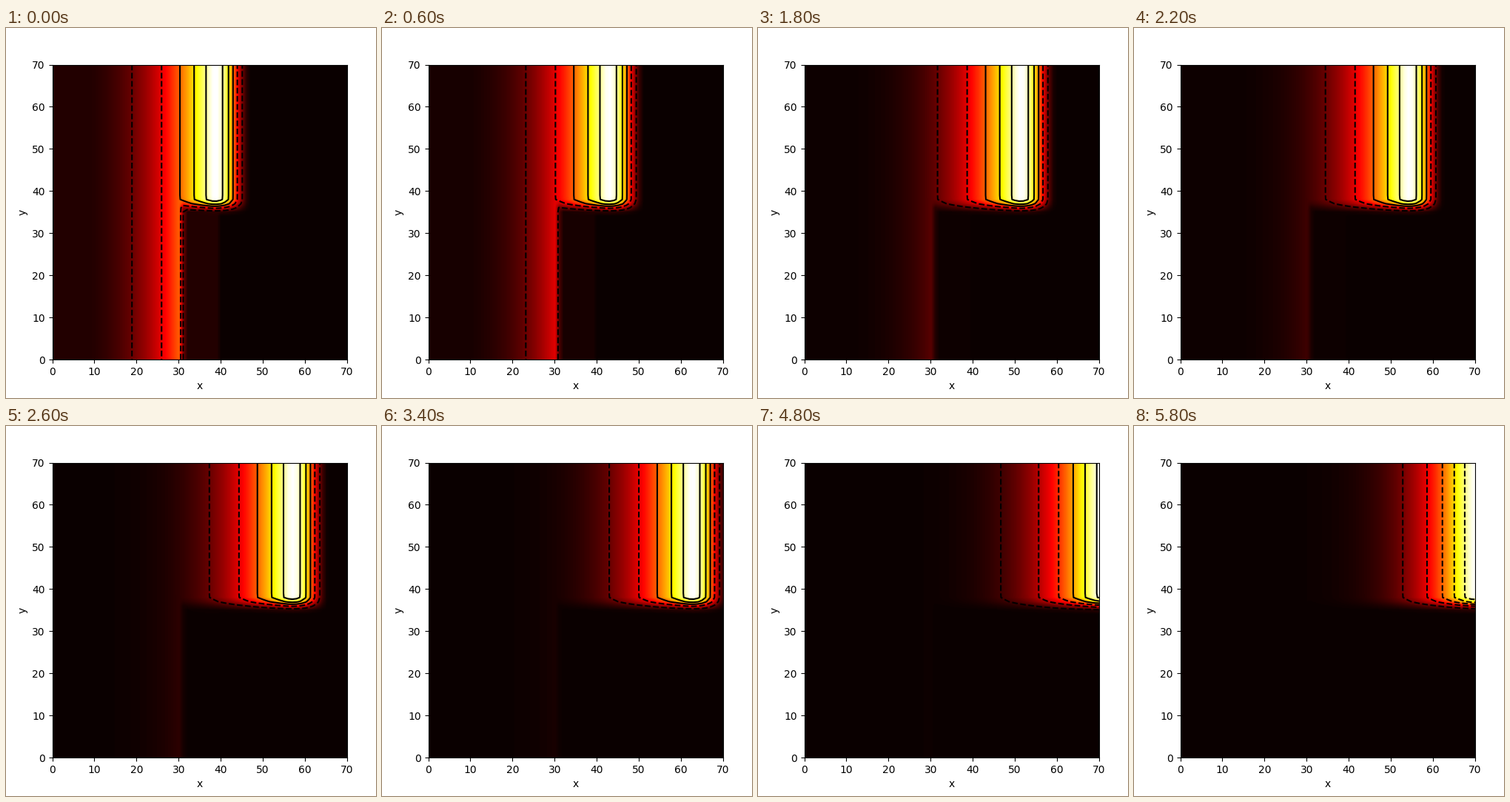
Animation of 500 by 500 pixels, one loop 5.9 s. Source, as a matplotlib script:

```python
import matplotlib.pyplot as plt
import numpy as np
from matplotlib.animation import FuncAnimation

FRAMES = 59
SIZE = 70
SPEED = 0.707             # wave travel per frame
REST, RANGE = -1.385, 2.63

axis = np.arange(SIZE + 1)
X, Y = np.meshgrid(axis, axis)


def ramp(x, start, width):
    """Half-cosine step from 0 to 1."""
    return (1 - np.cos(np.pi * np.clip((x - start) / width, 0, 1))) / 2


def pulse(pos):
    """Steep front on the right, long recovery tail on the left."""
    back = 37.78 - pos
    tail = np.exp(-0.0755 * back - 0.0014 * back**2)
    return tail * (1 - ramp(pos, 37.2, 9.8))


# The lower right block does not conduct
conduct = np.maximum(ramp(Y, 34.45, 3.75), 1 - ramp(X, 29.9, 1.7))


def field(n):
    # Once the front has left, the tail flattens against the right wall
    late = np.clip((n - 42) / 16, 0, 1)
    gap = np.hypot(SIZE - axis, 1.8 * late) * (1 - 0.055 * late)
    wave = pulse(SIZE - gap + 0.85 * late - SPEED * n)
    residue = 0.038 * np.exp(-n / 10) * (X < 39.5)
    return REST + RANGE * np.maximum(wave * conduct, residue)


fig = plt.figure(figsize=(5, 5), dpi=100)
ax = fig.add_axes([0.125, 0.104, 0.797, 0.797])
image = ax.imshow(field(0), cmap="hot", origin="lower", aspect="auto",
                  interpolation="bilinear",
                  extent=(-0.5, SIZE + 0.5, -0.5, SIZE + 0.5))
ticks = range(0, SIZE + 1, 10)
ax.set(xlabel="x", ylabel="y", xticks=ticks, yticks=ticks,
       xlim=(0, SIZE), ylim=(0, SIZE))


def update(n):
    v = field(n)
    image.set_data(v)
    image.set_clim(v.min(), v.max())
    for lines in list(ax.collections):
        lines.remove()
    ax.contour(X, Y, v, 5, colors="k")
    return [image]


anim = FuncAnimation(fig, update, frames=FRAMES, interval=100,
                     repeat=True, repeat_delay=0, blit=False)
plt.show()
```
